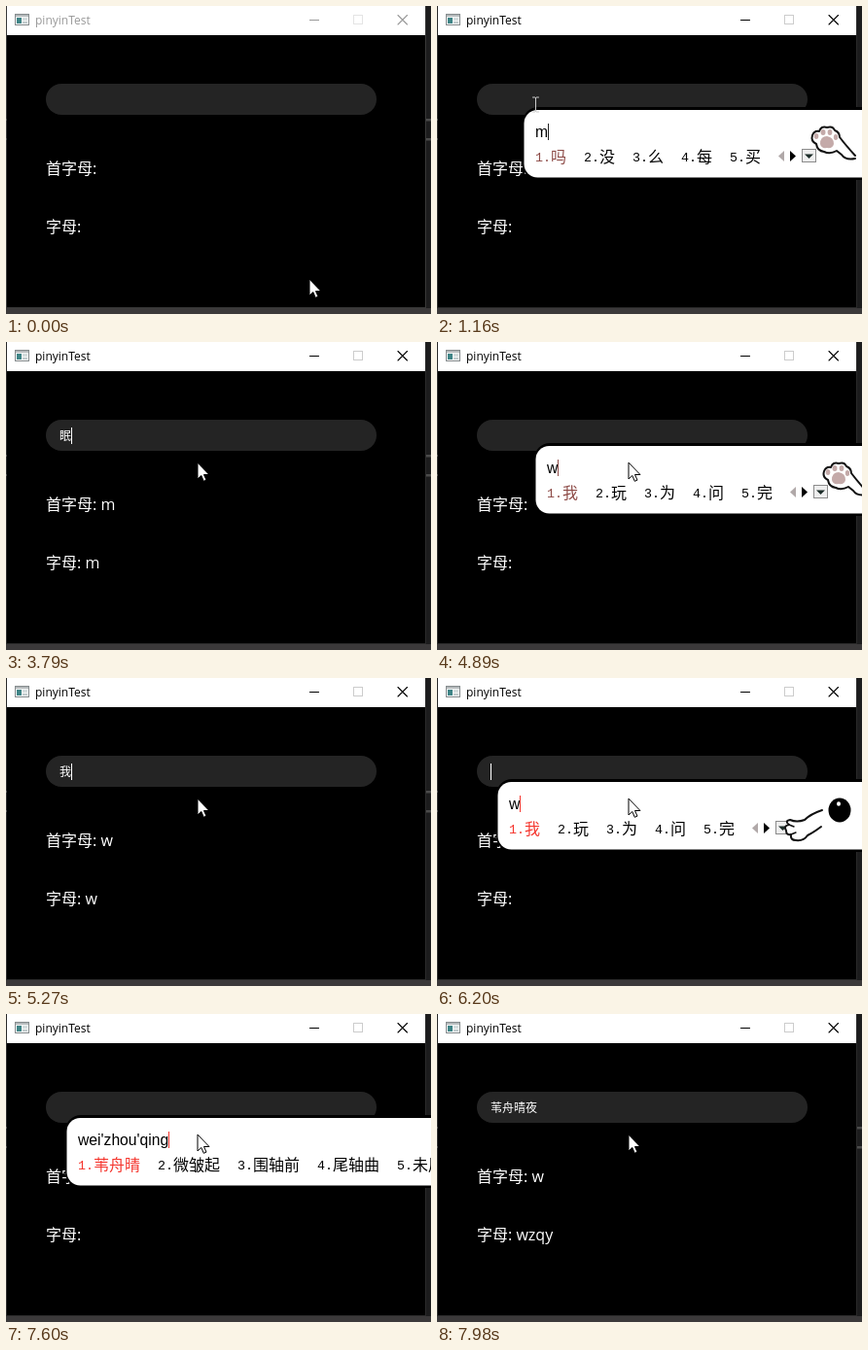
An HTML page for the animation above (8 s loop, 437 by 317 pixels).

```html
<!DOCTYPE html>
<html lang="zh">
<head>
<meta charset="utf-8">
<title>pinyinTest</title>
<style>
html, body { margin: 0; width: 100%; height: 100%; overflow: hidden; background: #000; }
svg { display: block; width: 437px; height: 317px; }
text { white-space: pre; }
.title { font: 12px "Open Sans", "Noto Sans", sans-serif; }
.label { font: 16px "Open Sans", "Noto Sans CJK SC", "Noto Sans CJK", sans-serif; fill: #fff; }
.field { font: 12px "Noto Sans CJK SC", "Noto Sans CJK", sans-serif; fill: #fff; }
.typed { font: 15.7px "Liberation Sans", Arial, sans-serif; }
.num { font: 13.33px "Liberation Mono", monospace; }
.word { font: 300 16px "Noto Sans CJK SC", "Noto Sans CJK", sans-serif; }
.word tspan { font: 15px "Liberation Sans", Arial, sans-serif; }
</style>
</head>
<body>
<svg id="stage" viewBox="0 0 437 317" xmlns="http://www.w3.org/2000/svg"></svg>
<script>
const LOOP = 8000;
const RED = '#f5362e', DULL = '#8d4b47';
const stage = document.getElementById('stage');

const initials = { 眠: 'm', 雨: 'y', 书: 's', 楼: 'l', 我: 'w', 苇: 'w', 舟: 'z', 晴: 'q', 夜: 'y' };

// Candidate lists; a longer input falls back to its longest known prefix.
const candidates = {
  "m": '吗 没 么 每 买',
  "mi": '米 密 迷 蜜 秘',
  "mian'y": '眠雨 棉衣 绵羊 面议 免疫',
  "mian'y's": '眠雨书 绵羊山 棉衣上 面议书',
  "mian'y'shu'l": '眠雨书楼 绵延速(su)率 绵羊树林 棉野书林',
  "w": '我 玩 为 问 完',
  "we": '为 位 未 喂 维',
  "wei": '为 位 未 维 微',
  "wei'z": '位置 围着 为止 未知 伪装',
  "wei'zhou": '苇舟 微皱 围轴 尾轴 未周',
  "wei'zhou'q": '苇舟晴 微皱起 围轴前 尾轴曲 未周全',
  "wei'zhou'qing'y": '苇舟晴夜 微皱轻衣 围轴青叶 尾轴前沿'
};

// Each step changes part of the state at its time.
const start = { active: false, caret: false, text: '', typed: '', left: 88, paw: 'up',
  mark: RED, bar: '#222', pointer: 'arrow', x: 312, y: 281 };
const steps = [
  [0, {}],
  [70, { x: 262, y: 229 }],
  [150, { x: 168, y: 151 }],
  [230, { pointer: 'beam', x: 101, y: 101 }],
  [460, { active: true }],
  [530, { caret: true }],
  [930, { caret: false }],
  [1160, { typed: 'm', mark: DULL }],
  [1230, { mark: RED, paw: 'down' }],
  [1310, { paw: 'up' }],
  [1390, { typed: 'mi' }],
  [1460, { caret: true }],
  [1690, { typed: "mian'y" }],
  [1860, { typed: "mian'y's" }],
  [2010, { typed: "mian'y'sh", caret: false }],
  [2170, { typed: "mian'y'shu'l" }],
  [2400, { typed: '', text: '眠雨书楼' }],
  [2550, { caret: true }],
  [2870, { x: 104, y: 104 }],
  [2940, { x: 109, y: 109 }],
  [3110, { pointer: 'arrow', x: 150, y: 116, caret: false }],
  [3180, { x: 186, y: 122 }],
  [3260, { x: 197, y: 124, text: '眠雨书', caret: true }],
  [3410, { text: '眠雨' }],
  [3790, { text: '眠' }],
  [4110, { text: '' }],
  [4720, { caret: false }],
  [4890, { typed: 'w', left: 100, paw: 'up', mark: DULL, bar: DULL }],
  [4970, { mark: RED, bar: RED, paw: 'down' }],
  [5040, { paw: 'up' }],
  [5190, { typed: '', text: '我' }],
  [5270, { caret: true }],
  [5820, { text: '' }],
  [6200, { typed: 'w', left: 61, paw: 'down' }],
  [6370, { typed: 'we', caret: false }],
  [6450, { typed: 'wei', paw: 'up' }],
  [6600, { typed: "wei'z" }],
  [6680, { typed: "wei'zh" }],
  [6830, { typed: "wei'zho" }],
  [6980, { typed: "wei'zhou", caret: true }],
  [7290, { typed: "wei'zhou'q" }],
  [7370, { typed: "wei'zhou'qi" }],
  [7440, { typed: "wei'zhou'qin" }],
  [7520, { typed: "wei'zhou'qin", caret: false }],
  [7600, { typed: "wei'zhou'qing" }],
  [7750, { typed: "wei'zhou'qing'y" }],
  [7830, { typed: "wei'zhou'qing'ye" }],
  [7980, { typed: '', text: '苇舟晴夜' }]
];
const states = [];
steps.forEach(([, patch], i) => states.push({ ...(states[i - 1] || start), ...patch }));

const rect = (x, y, w, h, fill, more = '') =>
  `<rect x="${x}" y="${y}" width="${w}" height="${h}" fill="${fill}" ${more}/>`;
const path = (d, fill, stroke = 'none', width = 1) =>
  `<path d="${d}" fill="${fill}" stroke="${stroke}" stroke-width="${width}" stroke-linejoin="round" stroke-linecap="round"/>`;
const text = (kind, x, y, str, fill = '') =>
  `<text class="${kind}" x="${x}" y="${y}" ${fill && `fill="${fill}"`}>${str}</text>`;
const oval = (x, y, rx, ry, fill) =>
  `<ellipse cx="${x}" cy="${y}" rx="${rx}" ry="${ry}" fill="${fill}"/>`;

const meter = document.createElement('canvas').getContext('2d');
function typedWidth(str) {
  meter.font = '15.7px "Liberation Sans", Arial, sans-serif';
  return meter.measureText(str).width;
}

function desktop() {
  return rect(0, 0, 437, 317, '#1c1c1d') + rect(0, 311, 437, 6, '#3b393a') +
    [116, 136].map(y => rect(0, y, 437, 2.5, '#4b4b4b')).join('');
}

function appWindow(s) {
  const ink = s.active ? '#000' : '#999';
  return rect(0, 0, 432, 311, s.active ? '#2a2a2a' : '#383838') +
    rect(0, 116, 1, 2, '#555') + rect(0, 136, 1, 2, '#555') +
    rect(1, 30, 430, 280, '#000') + rect(1, 0, 430, 30, '#fff') +
    rect(9.5, 8.5, 14, 11, '#f4f6f6', 'stroke="#858b8d"') +
    rect(10, 9, 13, 2, '#b5babc') + rect(11, 12, 5, 6, '#3f8587') +
    rect(17, 12, 5, 3, '#d4dcdd') + rect(17, 16, 5, 2, '#c0cacc') +
    text('title', 30, 19, 'pinyinTest', ink) +
    rect(312, 14, 10, 1, ink) +
    rect(357.5, 9.5, 9, 9, 'none', `stroke="${s.active ? '#ccc' : '#e4e4e4'}"`) +
    path('M403 9.5l9.5 9.5M412.5 9.5l-9.5 9.5', 'none', ink, 1.1);
}

function form(s) {
  const letters = [...s.text].map(c => initials[c]).join('');
  return rect(41, 80, 340, 32, '#242424', 'rx="16"') +
    text('field', 55, 101, s.text) +
    (s.caret ? rect(55 + 12 * s.text.length, 88, 1, 17, '#fff') : '') +
    text('label', 41, 173, '首字母: ' + letters.slice(0, 1)) +
    text('label', 41, 233, '字母: ' + letters);
}

function pawUp() {
  return path('M55 33Q45 35 41 29L36 25Q29 29 23 26Q16 25 15 18Q9 15 11 9Q13 4 18 5Q20 -1 26 1Q32 -1 34 4Q39 6 39 11Q45 19 55 30', '#fff', '#111', 2) +
    path('M19 18Q19 10 26 10Q33 11 33 18Q32 23 26 22Q20 23 19 18Z', '#c4aaa9') +
    oval(15, 10, 2.3, 3, '#c4aaa9') + oval(22, 6, 2.5, 3, '#c4aaa9') +
    oval(29, 6, 2.4, 3, '#c4aaa9') + oval(35, 11, 2.2, 3, '#c4aaa9');
}

function pawDown() {
  return path('M48 12Q36 16 30 22Q22 25 15 22Q9 23 14 27Q8 28 11 33Q11 38 16 37Q15 43 21 43Q29 44 33 38Q39 35 47 29', '#fff', '#111', 2) +
    path('M14 27L19 29M16 37L21 35', 'none', '#111', 1.4) +
    oval(66, 12, 11.5, 12.5, '#000') + oval(65, 5.5, 2, 2.3, '#fff');
}

function pager(x, paw) {
  return path(`M${x + 6} 149v11l-6-5.5z`, '#b0a8a8') +
    path(`M${x + 12} 149v11l6-5.5z`, '#000') +
    rect(x + 24.5, 147.5, 14, 13, '#eee', 'stroke="#8b8b8b"') +
    path(`M${x + 27} 152.5h9l-4.5 4.5z`, '#1c2c28') +
    `<g transform="translate(${x + 24} 124)">${paw === 'up' ? pawUp() : pawDown()}</g>`;
}

function wordList(typed) {
  let key = typed;
  while (!candidates[key]) key = key.slice(0, -1);
  return candidates[key].split(' ');
}

function inputPanel(s) {
  if (!s.typed) return '';
  const left = s.left + 13;
  let x = left;
  let out = rect(s.left, 104, 700, 75, '#000', 'rx="16"') +
    rect(s.left + 1.5, 107, 700, 69.5, '#fff', 'rx="14"') +
    text('typed', left, 135, s.typed, '#000') +
    rect(Math.round(left + typedWidth(s.typed)), 121, 1, 17, s.bar);
  wordList(s.typed).forEach((word, i) => {
    const fill = i ? '#000' : s.mark;
    out += text('num', x, 160, `${i + 1}.`, fill) +
      text('word', x + 16, 160.5, word.replace(/\(\w+\)/, '<tspan>$&</tspan>'), fill);
    x += 34 + [...word].reduce((w, c) => w + (c < '\u0100' ? 6.5 : 16), 0);
  });
  return out + pager(x, s.paw);
}

function pointer(s) {
  const beam = path('M-3 -7.5h2.5l.5 .5l.5 -.5h2.5M0 -7V7M-3 7.5h2.5l.5 -.5l.5 .5h2.5', 'none', '#ccc', 1);
  const arrow = path('M0 0V16.5L3.8 13L6.3 18.8L9 17.6L6.5 12H11.6Z', '#fff', '#000', 1);
  const dx = s.pointer === 'beam' ? 0.5 : 0;
  return `<g transform="translate(${s.x + dx} ${s.y + 0.5})">${dx ? beam : arrow}</g>`;
}

let shown = -1;
function draw(now) {
  const t = now % LOOP;
  let i = steps.length - 1;
  while (steps[i][0] > t) i--;
  if (i !== shown) {
    const s = states[i];
    stage.innerHTML = desktop() + appWindow(s) + form(s) + inputPanel(s) + pointer(s);
    shown = i;
  }
}

const began = performance.now();
function tick() {
  draw(performance.now() - began);
  requestAnimationFrame(tick);
}
tick();
</script>
</body>
</html>
```
